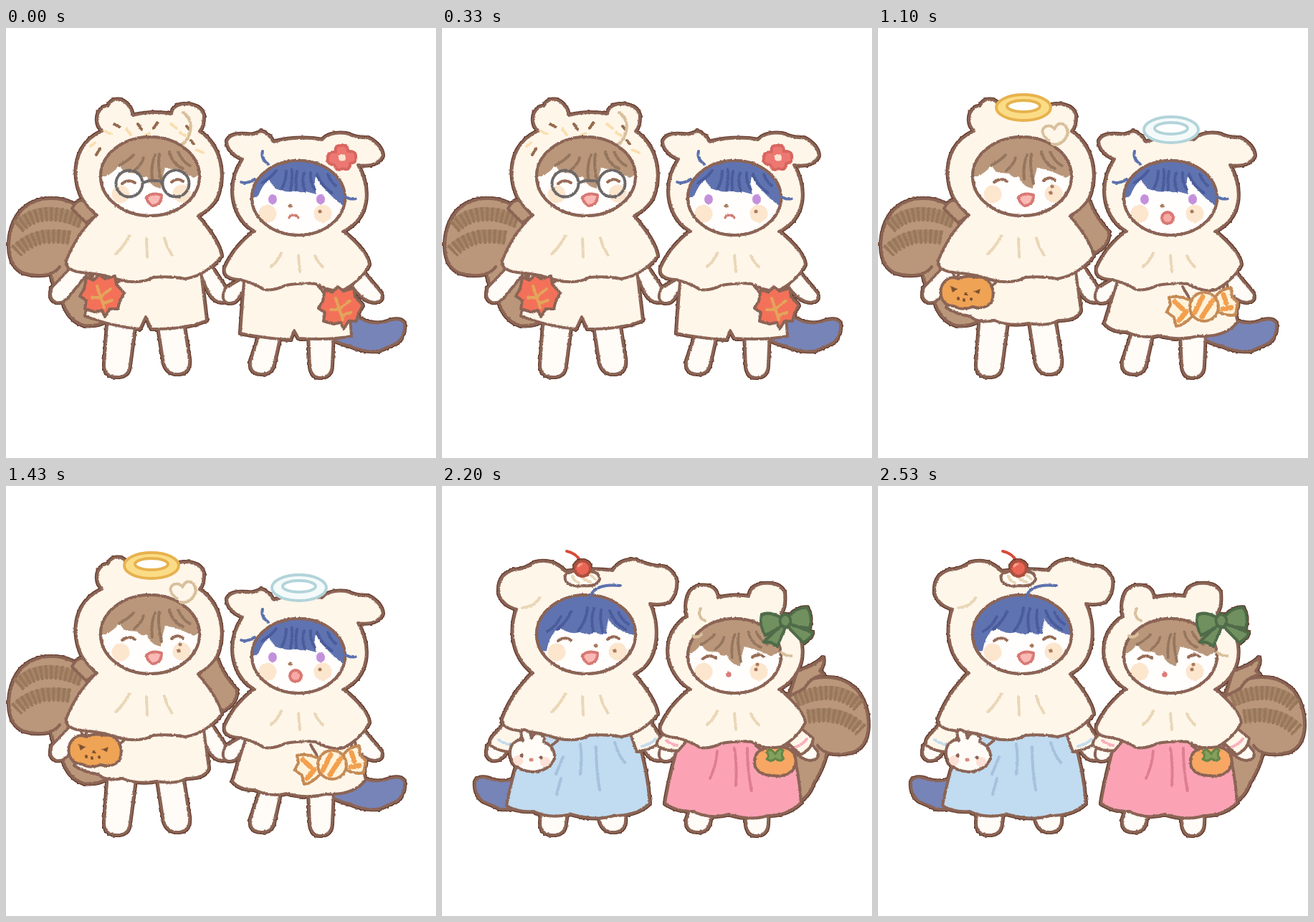
Recreate the animation shown at these times as an HTML page. Size 600 by 600 pixels, loop 2750 ms.

```html
<!DOCTYPE html>
<html lang="en">
<head>
<meta charset="utf-8">
<title>Costume friends</title>
<style>
html, body { margin: 0; width: 100%; height: 100%; overflow: hidden; background: #fff; }
svg { display: block; width: 100vw; height: 100vh; fill: none; stroke: #8b6455; stroke-width: 4; stroke-linecap: round; stroke-linejoin: round; }
.scene { visibility: hidden; animation: show 2.75s step-end infinite; animation-delay: calc(var(--i) * .55s - 2.75s); }
@keyframes show { 0% { visibility: visible; } 20%, 100% { visibility: hidden; } }
.art { filter: url(#edge); }
.cream { fill: #fff6ea; }
.white { fill: #fffcf7; }
.brown { fill: #ba977a; }
.indigo { fill: #7784b8; }
.red { fill: #ea6553; }
.sky { fill: #c1dbf0; }
.pink { fill: #fba3b5; }
.flat { stroke: none; }
.thin { stroke-width: 3; }
.tan { stroke: #e9d7b6; }
.curl { stroke: #d8c09c; }
.strand { stroke: #5b70ad; }
.skyline { stroke: #c4dcee; }
.pinkline { stroke: #f9b0bc; }
.dots { stroke: #a97b5b; stroke-width: 5; }
.eyes { fill: #c490dc; stroke: none; }
.band { stroke-width: 12; stroke-linecap: butt; }
.band + .band { stroke-width: 8; }
</style>
</head>
<body>
<svg viewBox="0 0 600 600">
<defs>
<filter id="edge" filterUnits="userSpaceOnUse" x="0" y="0" width="600" height="600" color-interpolation-filters="sRGB">
  <feTurbulence type="fractalNoise" baseFrequency=".35" numOctaves="2" seed="4"/>
  <feDisplacementMap in="SourceGraphic" scale="2.6" xChannelSelector="R" yChannelSelector="G" result="art"/>
  <feMorphology in="art" operator="dilate" radius=".6"/>
  <feColorMatrix values="0 0 0 0 .38  0 0 0 0 .22  0 0 0 0 .16  0 0 0 1 0"/>
  <feMerge><feMergeNode/><feMergeNode in="art"/></feMerge>
</filter>

<!-- tails -->
<g id="bushy">
  <path class="brown" d="M122 268Q96 238 65 238Q38 237 20 256Q4 276 4 305Q5 334 25 342Q44 348 62 343Q67 365 80 385Q88 408 108 415Q128 417 142 408L150 330Z"/>
  <g stroke="#98775a" stroke-linecap="butt">
    <path stroke-width="18" opacity=".55" d="M19 275Q50 246 103 270M18 308Q42 284 86 292"/>
    <path stroke-width="20" stroke-dasharray="4 3" d="M17 278Q50 246 106 270M14 312Q42 284 90 293"/>
  </g>
  <path d="M62 343Q70 340 75 333"/>
</g>
<path id="sleek" class="indigo" d="M450 432Q464 440 480 444Q500 453 520 451Q533 445 545 440Q558 430 556 412Q550 403 536 408Q518 415 500 408L480 398"/>
<g id="tails">
  <use href="#bushy"/><use href="#sleek"/>
  <path class="brown" d="M92 252Q98 240 108 240L126 262L112 272Z"/>
</g>
<g id="tailsFlip">
  <use href="#sleek" transform="matrix(-1 0 0 1 602 0)"/>
  <use href="#bushy" transform="matrix(-1 0 0 1 599 29)"/>
</g>

<!-- limbs -->
<path id="limbsL" class="white" d="M142 400L137 470Q137 487 155 487Q172 487 173 470L181 410M211 410L220 468Q225 484 242 483Q258 480 256 462L247 405M96 328L64 362Q58 378 70 383Q82 385 90 372L112 345M270 340L283 370Q292 384 303 383Q314 380 309 366L284 328"/>
<path id="limbsR" class="white" d="M356 420L341 465Q339 482 356 483Q370 484 374 470L384 425M422 425L424 472Q426 489 440 488Q455 486 455 470L457 425M332 348L306 363Q298 380 310 384Q320 385 326 375L338 355M497 338L524 370Q528 381 515 383Q500 383 484 362"/>
<g id="sleevesL">
  <path class="cream" d="M92 326L70 350Q65 358 68 362Q80 371 98 371L114 345M290 328L306 352Q302 366 272 371L262 344"/>
  <path class="skyline" d="M79 354Q88 361 98 361M279 363Q292 360 298 353"/>
  <path d="M168 350L153 362M120 340L125 348"/>
</g>
<g id="sleevesR">
  <path class="cream" d="M330 335L306 349Q297 358 301 363Q314 371 330 369L342 355M495 333L518 352Q516 368 500 375L482 358"/>
  <path class="pinkline" d="M313 355Q320 361 328 362M494 364Q504 360 509 353"/>
</g>

<!-- capes and hoods -->
<g id="capeL">
  <path class="cream" d="M127 260Q98 288 84 325Q82 338 105 341Q135 343 160 352Q188 358 205 348Q230 346 250 350Q280 345 301 318Q298 298 266 260"/>
  <path class="tan" d="M172 290Q164 306 153 315M196 294L197 320M221 293Q224 306 232 317"/>
</g>
<g id="capeR">
  <path class="cream" d="M347 283Q318 305 305 335Q302 349 325 351Q345 355 360 365Q375 367 390 359Q415 355 432 357Q455 370 472 365Q498 350 507 330Q505 312 470 283"/>
  <path class="tan" d="M384 314Q379 326 370 333M408 317L410 340M431 318Q435 327 442 333"/>
</g>
<path id="bearL" class="cream" d="M127 261C98 240 90 200 105 170Q115 152 134 144Q123 132 129 118Q135 108 142 109Q148 97 160 100Q174 106 177 122Q203 115 231 120Q232 108 248 106Q272 106 276 122Q276 138 270 144C300 165 308 205 294 238Q286 252 268 262"/>
<g id="dogL">
  <path class="cream" d="M127 261C100 240 92 205 104 172Q84 166 79 150Q77 124 100 117Q118 116 128 107Q152 99 172 119Q205 114 238 118Q250 101 270 103Q286 110 300 112Q318 110 327 130Q329 148 318 161Q306 167 290 164C304 195 304 245 268 262"/>
  <path class="tan" d="M112 170Q130 168 136 156"/>
</g>
<path id="dogR" class="cream" d="M347 284C316 265 305 222 330 183Q309 174 308 158Q313 146 335 148Q347 150 356 144Q366 146 373 159Q408 150 441 156Q452 144 475 147Q490 154 505 153Q524 163 526 178Q518 195 491 191C510 225 508 265 470 284"/>
<path id="bearR" class="cream" d="M347 284C312 262 300 210 342 182Q337 163 346 147Q356 135 374 140Q384 144 385 156Q408 150 428 154Q430 139 448 136Q472 134 478 149Q480 168 473 178C508 198 518 258 470 284"/>

<!-- heads -->
<ellipse id="ringL" cx="201" cy="207" rx="69" ry="55"/>
<ellipse id="ringR" cx="408" cy="237" rx="65" ry="52"/>
<clipPath id="clipL"><use href="#ringL"/></clipPath>
<clipPath id="clipR"><use href="#ringR"/></clipPath>
<g id="faceL">
  <use href="#ringL" fill="#fffefd"/>
  <path stroke="#fde6ce" stroke-width="25" d="M160 232h.1M245 231h.1"/>
</g>
<g id="faceR">
  <use href="#ringR" fill="#fffefd"/>
  <path stroke="#fde6ce" stroke-width="25" d="M365 259h.1M442 259h.1"/>
</g>
<g id="fringe">
  <path class="brown flat" d="M128 206L138 207Q152 202 158 190Q163 202 170 202L183 203Q189 211 196 207Q201 221 216 224Q218 208 222 195Q240 198 262 209L280 200V140H128Z"/>
  <path stroke="#95765f" d="M158 192Q172 184 178 177M179 199Q190 190 192 181M204 211Q202 190 208 177M217 217Q211 190 214 176M228 173Q232 190 247 196M240 173Q246 186 256 192"/>
</g>
<g id="brownL">
  <use href="#faceL"/><g clip-path="url(#clipL)"><use href="#fringe"/></g><use href="#ringL"/>
</g>
<g id="brownR">
  <use href="#faceR"/><g clip-path="url(#clipR)"><use href="#fringe" transform="matrix(.94 0 0 .94 213 41)"/></g><use href="#ringR"/>
</g>
<g id="blueL">
  <use href="#faceL"/>
  <g clip-path="url(#clipL)">
    <path fill="#6073b1" class="flat" d="M128 232L146 230Q150 206 164 198Q180 208 192 204Q205 209 213 204Q222 209 230 206Q230 194 232 186Q247 206 272 208L280 140H128Z"/>
    <path stroke="#4b5c9c" d="M147 203Q160 195 166 182M161 200Q176 187 180 175M190 202Q201 190 203 170M211 203Q207 185 212 171M224 203Q220 185 222 173M234 174Q240 192 256 200M246 176Q251 187 260 193"/>
  </g>
  <use href="#ringL"/>
  <path class="dots" d="M214 223h1M241 230h.1"/>
</g>
<g id="blueR">
  <use href="#faceR"/>
  <g clip-path="url(#clipR)">
    <path fill="#6073b1" class="flat" d="M338 240L352 234Q358 219 367 211Q374 226 386 227Q396 230 405 227Q412 231 418 228L433 232Q429 220 432 207Q450 235 476 252L482 180H338Z"/>
    <path stroke="#4b5c9c" d="M357 216Q369 210 377 199M385 224Q391 212 391 200M397 226Q400 210 399 197M405 226Q404 210 406 200M417 227Q412 212 416 202M431 226Q424 213 425 202M434 204Q440 221 455 230M449 204Q453 214 460 220"/>
  </g>
  <use href="#ringR"/>
  <path class="strand" d="M358 172Q355 182 366 190M328 215Q336 218 347 211M473 235Q479 240 488 238"/>
  <use href="#eyes" x="200" y="23" class="eyes"/>
  <path class="dots" d="M396 248h1M438 256h.1"/>
</g>
<path id="ahoge" class="strand" d="M206 157Q211 135 249 139"/>

<!-- features -->
<g id="eyes"><ellipse cx="172" cy="216" rx="6" ry="7"/><ellipse cx="239" cy="216" rx="6" ry="7"/></g>
<path id="lids" stroke="#986b56" d="M162 217Q171 210 180 216M231 215Q239 208 247 214"/>
<g id="specs" stroke="#6d6868"><circle cx="172" cy="217" r="18.5"/><circle cx="237" cy="217" r="18.5"/><path d="M191 216Q204 210 218 215"/></g>
<path id="smile" fill="#fbb9b6" stroke="#d87873" d="M196 236Q204 229 217 233Q217 247 205 248Q198 246 196 236Z"/>
<path id="frown" stroke="#d27a72" class="thin" d="M203 239Q205 233 209 236Q213 233 216 239"/>

<!-- props -->
<g id="leaf">
  <path fill="#f37159" d="M-22-24L-12-20L-4-28L4-22L18-26L20-14L31-2L25 8L22 20L11 20L4 31L0 22L-10 24L-24 20L-22 8L-31 2L-25-8Z"/>
  <path stroke="#e3a55a" d="M-7-12L3 18M-2 3L12-8M-1 4L-14 4M2 12L14 8"/>
</g>
<g id="bow" fill="currentColor">
  <path d="M-6 4L-37 22L-26 24L-18 30L-2 9M6 4L38 20L34 25L22 31L3 9"/>
  <path d="M-6-5Q-22-15-34-12Q-40 2-33 14Q-18 11-6 5ZM6-5Q22-15 36-12Q42 2 34 14Q18 11 6 5Z"/>
  <circle r="8"/>
</g>
<g id="ribbon" color="#ee6452">
  <use href="#bow"/>
  <path stroke="#6f8b5b" stroke-width="5" d="M-32-2L-12 0M13 0L35-2M-28-8L-12-4M14 6L32 8M-22 18L-16 25M20 18L28 24"/>
</g>
<g id="bunny">
  <path class="white" d="M102 357Q108 353 113 355Q107 340 115 340Q124 342 125 352Q128 343 137 346Q144 349 142 357Q158 364 157 380Q150 398 126 399Q98 396 95 375Q94 362 102 357Z"/>
  <path stroke="#fde0d6" stroke-width="14" d="M106 383h.1M144 385h.1"/>
  <path stroke-width="5" d="M111 376h.1M138 379h.1"/>
  <path stroke="#d98a78" stroke-width="5" d="M124 382h1"/>
</g>
<path id="antler" class="brown" d="M331 184Q327 179 314 177Q302 169 309 163L317 166L307 151Q308 140 315 145L324 153L326 139Q332 133 334 142L334 153L340 140Q349 141 344 154Q339 168 344 180Z"/>
<path id="halo" fill-rule="evenodd" d="M-38 1A38 18 0 1 1 38 1A38 18 0 1 1-38 1ZM-23-1A23 8 0 1 0 23-1A23 8 0 1 0-23-1Z"/>
</defs>

<!-- autumn -->
<g class="scene" style="--i:0"><g class="art">
  <use href="#tails"/><use href="#limbsL"/>
  <path class="cream" d="M122 340L110 402Q150 417 187 420L195 403L203 420Q250 421 280 408L272 340"/>
  <path d="M115 340L121 352M162 350L152 358"/>
  <use href="#capeL"/><use href="#bearL"/><use href="#limbsR"/>
  <path class="cream" d="M332 354L327 426Q360 433 397 435L402 422L408 433Q450 436 482 430L477 358"/>
  <path d="M436 360L450 378M483 352L484 368"/>
  <use href="#capeR"/><use href="#dogR"/>
  <use href="#leaf" x="134" y="372"/><use href="#leaf" x="467" y="389"/>
  <path stroke="#966b4d" d="M151 134L158 138M184 134L189 141M211 132L206 140M131 168L126 177M252 137L257 143M258 157L262 162"/>
  <path stroke="#f9dfae" d="M138 144L147 148M168 141L174 149M194 150L200 147M230 134L238 140M243 146L250 150M118 165L124 160M266 170L275 174"/>
  <path class="curl" d="M247 118Q262 128 256 148Q252 158 246 162"/>
  <use href="#brownL"/><use href="#lids"/><use href="#specs"/><use href="#smile"/>
  <use href="#blueR"/><use href="#frown" x="192" y="26"/>
  <path stroke="#d7665f" fill="#ed7771" d="M460 173Q458 163 468 164Q477 161 477 172Q489 171 488 180Q490 188 480 189Q480 200 470 196Q461 201 458 191Q447 190 449 181Q449 172 460 173Z"/>
  <circle class="flat" cx="469" cy="181" r="5" fill="#fbe3d3"/>
</g></g>

<!-- winter -->
<g class="scene" style="--i:1"><g class="art">
  <use href="#tailsFlip"/>
  <path class="brown" d="M494 290L498 236Q520 240 525 252Q516 260 516 272ZM345 292Q327 290 316 282L322 276Q302 274 297 260Q312 264 340 256Z"/>
  <use href="#limbsL"/>
  <path class="red" d="M116 335L108 392Q155 398 196 396Q240 396 280 388L270 335"/>
  <path class="white" d="M108 388Q130 383 150 388Q170 394 187 390Q196 402 190 415Q175 426 158 420Q135 422 122 413Q104 410 104 398ZM196 394Q220 396 240 390Q262 392 280 387Q288 396 283 412Q268 420 250 419Q232 427 212 422Q194 418 196 394Z"/>
  <path d="M175 346L150 364M120 343L124 354"/>
  <path class="cream" d="M127 260L96 293Q77 308 80 325Q84 338 105 337Q122 338 134 343Q158 352 180 342Q207 335 208 318Q211 337 228 342Q250 350 270 345Q306 340 306 320Q306 308 296 301L266 260"/>
  <path class="tan" d="M92 302Q104 311 118 307Q134 321 152 315Q175 326 198 320M214 315Q240 324 252 314Q278 318 290 303"/>
  <use href="#dogL"/><use href="#limbsR"/>
  <path class="red" d="M336 350L328 402Q370 412 404 408Q450 412 485 402L478 350"/>
  <path class="white" d="M330 400Q350 404 365 400Q385 408 400 405Q410 420 400 430Q380 437 362 430Q340 430 325 422Q320 409 330 400ZM406 408Q430 412 450 406Q470 409 486 402Q494 418 482 430Q460 436 440 433Q420 438 407 430Q400 418 406 408Z"/>
  <path d="M430 365L446 378M484 360L484 370"/>
  <path class="cream" d="M347 283L312 315Q296 328 300 340Q310 350 330 348Q345 360 365 359Q402 356 408 335Q412 358 436 359Q456 366 476 356Q510 352 514 332Q514 320 502 313L470 283"/>
  <path class="tan" d="M308 318Q320 328 334 323Q348 337 366 333Q384 343 400 338M414 332Q438 340 452 330Q478 336 502 319"/>
  <use href="#bearR"/>
  <path class="cream" d="M328 219Q311 219 313 202Q318 185 345 187M488 219Q512 222 515 206Q512 187 474 187"/>
  <path class="tan" d="M325 207Q332 208 337 203M483 208Q488 210 494 206"/>
  <use href="#antler"/><use href="#antler" transform="matrix(-1.05 .12 .1 1.08 815 -46)"/>
  <path class="red" d="M158 118Q168 86 181 80Q206 92 214 114Z"/>
  <path class="white" d="M160 117Q170 109 184 114Q198 107 210 111Q225 110 228 122Q228 134 212 133Q196 139 182 135Q164 141 156 131Q154 122 160 117ZM164 82Q158 72 168 68Q176 60 184 67Q194 70 190 80Q186 88 178 84Q170 90 164 82Z"/>
  <use href="#blueL"/><use href="#ahoge"/><use href="#eyes" class="eyes"/><use href="#smile"/>
  <use href="#brownR"/><use href="#lids" x="202" y="23"/><use href="#specs" x="199" y="24"/><use href="#smile" x="198" y="26"/>
  <path class="dots" d="M438 250h.1"/>
  <path class="tan" d="M352 184Q344 170 353 165Q362 162 367 169Q371 157 380 162Q391 168 378 177M356 188L370 189"/>
  <use href="#ribbon" x="201" y="276"/><use href="#ribbon" x="400" y="302"/>
  <path fill="#71905f" d="M135 354L142 364L139 369L150 377L145 382L152 391Q145 400 136 395Q127 403 120 395Q109 400 104 388L111 380L106 374L118 368L116 360Z"/>
  <path class="flat" fill="#f5c44b" d="M134 347L138 352L145 352L140 358L141 363L134 361L128 363L129 356L125 352L132 352Z"/>
  <g stroke-width="6"><path stroke="#f2cf57" d="M126 369h.1M135 385h.1"/><path stroke="#f09a8c" d="M117 383h.1M138 374h.1"/><path stroke="#79c6d3" d="M124 376h.1"/></g>
  <path class="red" d="M447 388Q440 408 448 420Q460 429 478 422Q490 410 488 382Z"/>
  <path class="white" d="M442 376Q455 373 464 373Q480 366 488 370Q492 382 484 386Q466 387 452 393Q440 389 442 376Z"/>
  <g color="#57794f" stroke="#456141" transform="translate(467 388) scale(.42 .66)"><use href="#bow"/></g>
  <path class="flat" fill="#f3b93e" d="M459 405Q468 396 476 407L468 415Z"/>
</g></g>

<!-- halos -->
<g class="scene" style="--i:2">
<g class="art">
  <use href="#tails"/>
  <path class="brown" d="M284 238L296 243Q302 262 322 284Q324 302 303 314L266 270Z"/>
  <use href="#limbsL"/>
  <path class="cream" d="M114 340L95 390Q110 400 128 402Q140 413 162 408Q185 417 210 412Q235 417 252 408Q278 408 283 394L276 340"/>
  <path d="M168 352L156 362M104 340L108 350"/>
  <use href="#capeL"/><use href="#bearL"/><use href="#limbsR"/>
  <path class="cream" d="M334 354L316 412Q325 424 347 424Q370 435 392 429Q420 437 446 430Q485 432 502 410L486 354"/>
  <path d="M425 361L434 376M484 352L482 364"/>
  <use href="#capeR"/><use href="#dogR"/>
  <path fill="#efa354" d="M92 355Q100 345 112 350Q124 344 136 348Q150 345 157 357Q164 370 158 383Q148 394 132 389Q118 395 106 388Q92 388 88 374Q86 362 92 355Z"/>
  <path class="flat" fill="#7d5132" d="M101 360L111 364L104 369ZM133 368L143 364L141 371Z"/>
  <path stroke="#7d5132" d="M112 377v1M120 379v1M130 378v1M122 371h1"/>
  <g fill="#fff3dc" stroke="#c48a55">
    <path d="M437 381Q420 372 406 376L408 386L403 396L413 404L416 416Q428 415 440 400ZM471 374Q482 362 493 363L494 376L502 383L499 400Q488 403 475 396Z"/>
    <circle cx="455" cy="389" r="20"/>
  </g>
  <path stroke="#f3a04e" stroke-width="7" d="M442 397L453 375M452 403L467 380M414 382L425 392M420 408L430 396M482 372L486 384M481 392L493 390"/>
  <use href="#brownL"/><use href="#lids" y="-2"/><use href="#smile"/>
  <path class="curl" d="M238 157Q224 145 233 138Q241 134 246 141Q252 129 261 136Q270 148 257 159Q250 164 243 162"/>
  <path class="dots" d="M243 221h.1M241 230h.1"/>
  <use href="#blueR"/>
  <circle cx="404" cy="265" r="8" fill="#f9a9a5" stroke="#d87873"/>
</g>
<ellipse class="flat" cx="203" cy="109" rx="23" ry="8" fill="#fff"/>
<use href="#halo" x="203" y="110" fill="#fbdc86" stroke="#e7b24e"/>
<use href="#halo" x="409" y="141" fill="#f4fafa" stroke="#b2d4da"/>
</g>

<!-- ribbon jackets -->
<g class="scene" style="--i:3"><g class="art">
  <use href="#tailsFlip"/><use href="#limbsL"/>
  <path class="sky" d="M124 335Q110 395 110 424Q122 436 125 457Q155 468 186 462Q188 442 197 436Q204 442 206 457Q234 463 262 453Q263 438 273 430Q276 390 264 335"/>
  <path d="M200 403Q195 418 197 436"/>
  <path stroke="#a5c3dd" d="M139 439Q155 446 171 444M222 443Q238 444 250 438"/>
  <use href="#sleevesL"/>
  <path class="cream" d="M127 260L92 308Q80 322 84 328Q108 334 134 340Q175 352 205 347Q235 351 260 345Q290 340 300 325Q292 300 266 260"/>
  <path class="skyline" d="M96 313Q130 327 156 326M188 332Q210 329 232 332Q264 331 290 318"/>
  <use href="#dogL"/><use href="#limbsR"/>
  <path class="pink" d="M340 350Q328 400 328 428Q340 440 341 459Q368 470 392 463Q394 450 404 445Q413 450 416 467Q444 471 467 465Q468 448 480 436Q486 400 478 350"/>
  <path d="M404 408Q400 424 404 445"/>
  <path stroke="#e58397" d="M348 442Q364 450 381 447M425 451Q440 453 454 448"/>
  <use href="#sleevesR"/>
  <path stroke="#83a14c" d="M424 360L438 374M476 355L478 370"/>
  <path class="cream" d="M347 283Q322 310 312 332Q316 345 348 352Q385 361 412 357Q445 362 470 355Q494 352 504 333Q496 300 470 283"/>
  <path class="pinkline" d="M322 326Q350 342 367 340M386 345Q435 349 458 342Q480 342 495 330"/>
  <use href="#bearR"/><use href="#bunny"/>
  <path fill="#a9c956" stroke="#77994a" d="M440 380Q436 371 446 369Q454 373 460 367Q468 373 476 367Q482 374 479 382Q492 388 492 400Q482 412 460 410Q438 414 430 404Q430 390 440 380Z"/>
  <path stroke="#e5df66" stroke-width="5" d="M441 390L438 403M451 385L447 404M471 387L475 402M482 389L486 399"/>
  <circle cx="462" cy="395" r="8" fill="#c1db69" stroke="#70a04b"/>
  <path fill="#c98546" stroke="#99643b" d="M185 112Q190 105 197 109Q203 101 209 107Q218 103 221 111Q230 112 228 121Q235 126 228 131Q224 139 217 136Q210 144 203 138Q194 141 191 134Q182 134 184 126Q179 119 185 112Z"/>
  <path stroke="#e3a15f" stroke-width="7" d="M206 125h.1M197 125h.1M201 117h.1M211 117h.1M213 127h.1M204 133h.1"/>
  <path class="white thin" d="M184 262Q193 274 203 281Q216 272 226 261M382 289Q392 302 402 308Q416 302 425 289"/>
  <path class="band" d="M162 257Q178 277 200 287M248 255Q231 276 198 288M364 280Q375 304 396 316M453 278Q430 304 390 320"/>
  <path class="band" stroke="#c1dbf0" d="M162 257Q178 277 200 287M248 255Q231 276 198 288"/>
  <path class="band" stroke="#fba3b5" d="M364 280Q375 304 396 316M453 278Q430 304 390 320"/>
  <path class="sky thin" d="M188 290Q178 310 176 330L172 356L160 353Q165 314 182 286ZM190 292L186 338L179 370L167 366Q178 325 180 292ZM196 284Q211 280 221 286Q222 295 215 300L196 293ZM184 283L196 282L197 294L185 296Z"/>
  <path class="pink thin" d="M378 318Q371 340 367 380L355 377Q360 340 374 314ZM384 322L378 360L376 393L364 391Q370 350 374 322ZM390 314Q404 310 413 315Q412 325 406 330L390 325ZM376 314L389 313L390 325L378 326Z"/>
  <use href="#blueL"/>
  <path class="strand" d="M257 145Q262 157 251 164M121 212Q128 214 137 207M264 193Q272 193 279 187"/>
  <use href="#eyes" class="eyes"/><use href="#frown"/>
  <use href="#brownR"/><use href="#eyes" x="200" y="24" class="flat" fill="#cb5b51"/><use href="#frown" x="192" y="25"/>
  <path class="thin" d="M366 237Q372 233 379 236M431 237Q437 233 443 236"/>
  <path class="dots" d="M438 251h.1M438 258h.1"/>
  <path stroke-width="8" d="M366 173Q378 163 392 166M417 165Q432 162 445 173"/>
  <path class="tan thin" d="M366 173Q378 163 392 166M417 165Q432 162 445 173"/>
  <path fill="#ee8497" stroke="#d36e7f" d="M387 162Q388 150 405 149Q424 150 426 161Q422 174 406 175Q388 173 387 162Z"/>
  <path class="flat" fill="#f8dd83" d="M399 157Q400 150 406 152Q412 150 412 157Q420 159 415 164Q413 171 406 168Q399 171 398 165Q390 161 399 157Z"/>
  <circle class="flat" cx="406" cy="160" r="3" fill="#ee8a70"/>
  <path fill="#a6c7e2" stroke="#7398b8" class="thin" d="M399 180Q407 183 408 197Q400 203 391 197Q392 184 399 180Z"/>
</g></g>

<!-- sweets -->
<g class="scene" style="--i:4">
<path stroke="#d94a3a" d="M193 105Q188 94 174 91"/>
<g class="art">
  <use href="#tailsFlip"/>
  <path class="brown" d="M484 294L496 258Q520 251 532 239Q535 248 527 258L533 263Q515 266 506 282Z"/>
  <use href="#limbsL"/>
  <path class="sky" d="M122 338Q98 400 90 446Q106 456 128 454Q150 465 180 458Q215 468 240 460Q272 460 290 443Q286 390 268 338"/>
  <path stroke="#a4c2de" d="M169 378L159 402M193 360Q196 382 193 402M215 364Q215 395 220 424M241 358Q245 373 255 386M166 408L160 430"/>
  <use href="#sleevesL"/><use href="#capeL"/><use href="#dogL"/><use href="#limbsR"/>
  <path class="pink" d="M332 352Q316 410 311 443Q328 455 350 454Q375 466 400 458Q430 468 455 460Q482 460 501 442Q498 395 485 350"/>
  <path stroke="#de7e92" d="M384 370Q383 388 374 408M408 366Q412 390 410 418M426 366Q426 396 432 426"/>
  <use href="#sleevesR"/>
  <path d="M438 362L447 370M483 354L482 366"/>
  <use href="#capeR"/><use href="#bearR"/><use href="#bunny"/>
  <path fill="#f7a763" d="M440 372Q450 363 465 365Q482 362 490 372Q498 386 489 397Q478 407 462 404Q444 404 437 392Q434 380 440 372Z"/>
  <path fill="#83a15c" stroke="#678548" class="thin" d="M465 374Q458 364 453 371Q458 377 453 381Q460 386 465 380Q472 386 477 380Q472 376 476 369Q470 364 465 374Z"/>
  <path class="white" d="M173 133Q168 122 181 120Q190 114 201 119Q219 118 220 130Q216 141 198 139Q180 142 173 133Z"/>
  <path class="tan" d="M182 126Q184 133 191 135M194 125Q198 132 207 134M207 124L214 130"/>
  <circle cx="196" cy="115" r="11" class="red" stroke="#a9503f"/>
  <path stroke="#f4a38f" class="thin" d="M190 112Q192 109 195 109"/>
  <use href="#blueL"/><use href="#ahoge"/><use href="#lids" y="-1"/><use href="#smile"/>
  <use href="#brownR"/><use href="#lids" x="202" y="24"/>
  <path class="curl" d="M361 171Q355 182 367 188M350 209Q356 213 362 207M473 232Q480 238 488 237"/>
  <circle class="flat" cx="400" cy="263" r="3.8" fill="#dc7c78"/>
  <path class="dots" d="M440 249h.1M438 256h.1"/>
  <g color="#71905f" stroke="#4f6b49" transform="translate(479 188) rotate(-9) scale(.93 1.12)"><use href="#bow"/></g>
</g>
</g>
</svg>
</body>
</html>
```
